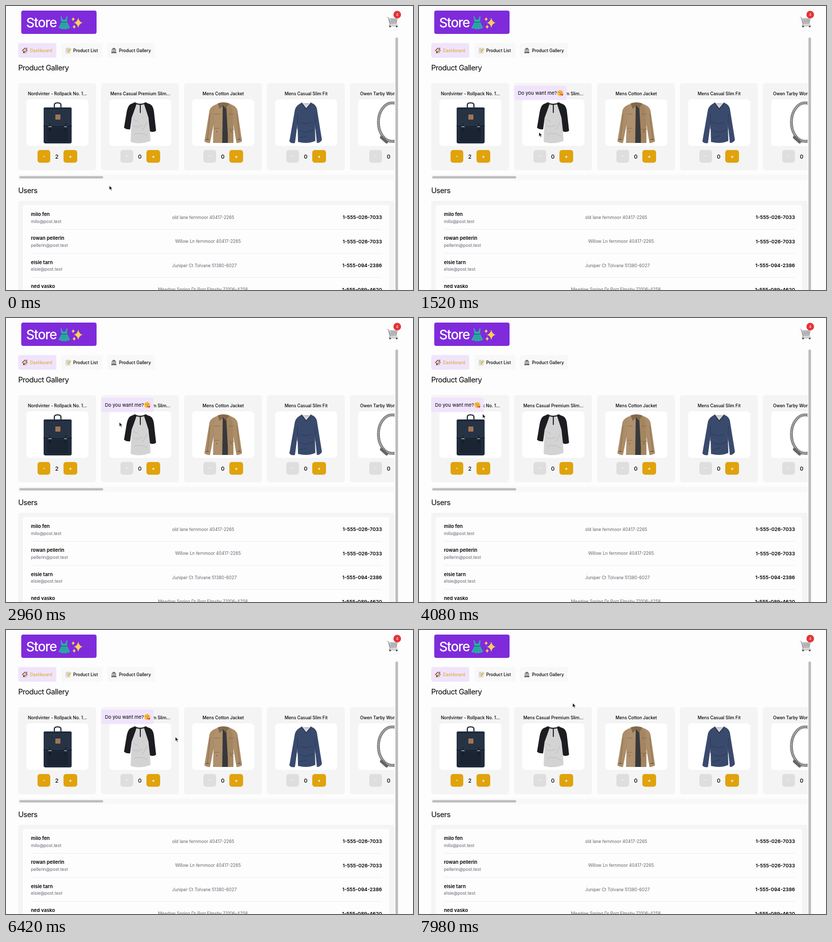
Recreate the animation shown at these times as an HTML page. Size 800 by 560 pixels, loop 8000 ms.

```html
<!DOCTYPE html>
<html lang="en">
<head>
<meta charset="utf-8">
<title>Store</title>
<style>
html, body { margin: 0; width: 100%; height: 100%; overflow: hidden; background: #fdfdfe; }
svg { display: block; }
text { font-family: Inter, "Liberation Sans", sans-serif; fill: #000; }
.logo { font-size: 26px; font-weight: 500; letter-spacing: -1.2px; fill: #fff; }
.head { font-size: 14.5px; letter-spacing: -.44px; }
.label { font-size: 8.5px; font-weight: 500; }
.gold { fill: #dda01c; font-weight: 400; }
.tip { font-size: 9.4px; }
.count { font-size: 11px; font-weight: 500; }
.sign { font-size: 10px; font-weight: 600; fill: #fff; }
.name { font-size: 9.6px; font-weight: 600; }
.soft { font-size: 8.5px; fill: #62646e; }
.badge { font-size: 7px; fill: #fff; }
</style>
</head>
<body>
<svg id="stage" width="800" height="560" viewBox="0 0 800 560">
  <defs><clipPath id="strip"><rect x="24" y="150" width="740" height="176"/></clipPath></defs>
</svg>
<script>
const stage = document.getElementById('stage');
const PAGE = '#fdfdfe', PANEL = '#f4f4f5', TRACK = '#f8f8f9', BAR = '#bcbcbd', LILAC = '#f0e4fc';
const GOLD = '#e0a30c', GOLD_HOVER = '#eaaa38', DISABLED = '#dededf';
const CARD_X = 24, CARD_STEP = 163, CARD_W = 153, CARD_TOP = 152, CARD_H = 172;

const box = (x, y, w, h, fill, r = 0, extra = '') =>
  `<rect x="${x}" y="${y}" width="${w}" height="${h}" rx="${r}" fill="${fill}" ${extra}/>`;
const text = (x, y, str, cls, anchor = 'start') =>
  `<text x="${x}" y="${y}" class="${cls}" text-anchor="${anchor}">${str}</text>`;
const shape = (d, fill, extra = '') => `<path d="${d}" fill="${fill}" ${extra}/>`;
const line = (d, color, width = 1) =>
  shape(d, 'none', `stroke="${color}" stroke-width="${width}" stroke-linecap="round"`);
const disc = (x, y, r, fill) => `<circle cx="${x}" cy="${y}" r="${r}" fill="${fill}"/>`;
const group = (x, y, content) => `<g transform="translate(${x} ${y})">${content}</g>`;
const star = (x, y, r) => group(x, y,
  shape(`M0 ${-r}Q${r * .16} ${-r * .16} ${r * .85} 0Q${r * .16} ${r * .16} 0 ${r}Q${-r * .16} ${r * .16} ${-r * .85} 0Q${-r * .16} ${-r * .16} 0 ${-r}Z`, '#f8d257'));

const dress =
  shape('M109 20L111 26Q114 28 117 26L119 20L121 21L120 31Q123 37 126 43Q115 49 103 43Q107 37 109 31L107 21Z', '#2fa9a8') +
  line('M109 32H119', '#0b716d', 1.6) +
  line('M111 35L108 44M114 35V45M117 35L121 44', '#13888a', .8);

const house = group(31, 82,
  shape('M2 5H10V11H2Z', '#dcc29c') + shape('M0 6L6 0L12 6L11 7L6 2L1 7Z', '#8f4437') +
  box(3, 7, 2.5, 4, '#6b4635') + box(7, 6.5, 2.2, 2.3, '#6f9dbd') + box(9, 0, 1.5, 3, '#7d4a40'));

const memo = group(117, 82,
  shape('M1 1H9V11H1Z', '#efeee8', 'stroke="#b3b3ae" stroke-width=".6"') +
  line('M2.5 3H7.5M2.5 5H7.5M2.5 7H5', '#8f8f8c', .6) + line('M5 9L10 3', '#e5a51c', 1.7));

const museum = group(207, 82,
  shape('M0 4L5 0L10 4Z', '#6d675b') + line('M1.5 5V9M4 5V9M6.2 5V9M8.5 5V9', '#5f5a50', 1.2) +
  box(0, 9, 10, 2, '#625d53'));

const cart =
  shape('M752 25H769L767 34H754Z', '#e9e9e9', 'stroke="#858588" stroke-width=".8"') +
  line('M749 22L752 23L755 36H769M754 28H768M754 31H767M757 25V34M760 25V34M763 25V34M766 25V34', '#757578', .8) +
  line('M755 36L753 39H770', '#757578') + disc(755, 40.5, 1.6, '#393939') + disc(768, 40.5, 1.6, '#393939');

const kiss = (x, y) => group(x, y,
  disc(0, 0, 6, '#f6c145') + line('M-3 -1.5Q-2 -2.7 -1 -1.5', '#573719', .9) + disc(2, -1.5, .8, '#573719') +
  line('M0 1Q2 1.5 0 2.4Q2 3 0 3.8', '#753b1c', .8) +
  shape('M4 6L1.5 3Q1.5 1 3.7 2.2Q5.8 .9 6.2 3Z', '#e83a4c'));

// Product pictures share one coordinate space: the card's top-left corner is 0,0.
const backpack =
  line('M71 49V43Q71 39 77 39Q84 39 84 43V49', '#1b2430', 2.2) +
  shape('M50 50Q50 48 53 48H102Q105 48 105 50L105 116Q105 119 101 119H54Q50 119 50 116Z', '#202b3a') +
  shape('M50 52H105V84Q77 86 50 84Z', '#263344') + line('M50 84.5Q77 87 105 84.5', '#121a25', 1.2) +
  box(57, 88, 41, 27, '#1a2432', 2) + box(73, 62, 10, 10, '#a07453', 1) +
  line('M62 80V96M93 80V96', '#121a25', 1.5) + line('M60 86H65M91 86H95', '#b9b8b4', 1.5);

const raglan =
  shape('M66 39Q77 43 88 39L94 62L97 114Q77 122 58 116L60 62Z', '#d3d3d4') +
  shape('M66 38L57 42Q52 46 50 58L45 88Q50 92 57 91L60 68Q66 52 70 40Z', '#1d1c20') +
  shape('M87 38L97 42Q103 46 104 58L108 94Q102 98 96 95L93 68Q88 52 84 40Z', '#1d1c20') +
  line('M66 39Q77 45 88 39', '#232226', 2.4) + line('M77 43V58', '#232226', 2) +
  line('M63 84Q72 89 81 83M65 101Q80 96 91 104M64 72L72 76M90 78L82 92', '#bababc', 1);

const jacket =
  shape('M66 41L77 38L90 41Q103 45 105 54L114 115Q108 119 103 118L97 82V118H57L58 82L51 118Q45 119 40 115L50 54Q52 45 66 41Z', '#ab8d69') +
  shape('M71 43H85L87 86L86 118H74L75 86Z', '#38393c') +
  shape('M66 40L76 45L75 118H57L60 52Z', '#af916d') + shape('M89 40L83 47L87 118H97L95 51Z', '#a38560') +
  shape('M66 40Q77 36 89 40L82 50L77 44L70 51Z', '#82694e') +
  line('M60 61H70M88 61H97M59 89H69M88 91H98M51 60L46 112M104 60L109 112', '#866c4d') +
  line('M64 95V96M92 94V96M43 111H49M105 111H111', '#4e3f2d', 1.2);

const sweater =
  shape('M68 39Q77 42 87 39Q96 42 98 50L108 112Q105 118 98 118L94 78L95 114Q80 121 61 116L60 80L55 118Q48 120 44 115L55 52Q58 43 68 39Z', '#394a6d') +
  shape('M69 39L77 50L86 39Q77 43 69 39Z', '#d4d4d6') + line('M68 39L77 51L87 39', '#26344f', 1.5) +
  line('M60 62V90M95 62V90M63 77Q76 83 88 77M65 94Q79 100 92 92M64 108L78 104', '#2c3a58', 1.1);

const bracelet =
  '<ellipse cx="83" cy="77" rx="27" ry="38" fill="none" stroke="#77777a" stroke-width="5.5"/>' +
  '<ellipse cx="83" cy="77" rx="27" ry="38" fill="none" stroke="#bcbcbe" stroke-width="3" stroke-dasharray="2 1.5"/>' +
  line('M62 107L72 116', '#666668', 6);

const products = [
  ['Nordvinter - Rollpack No. 1...', backpack, 2],
  ['Mens Casual Premium Slim...', raglan, 0],
  ['Mens Cotton Jacket', jacket, 0],
  ['Mens Casual Slim Fit', sweater, 0],
  ['Owen Tarby Womens Chain...', bracelet, 0]
];

const card = ([title, picture, count], i) => {
  const wide = i === products.length - 1;
  return group(CARD_X + i * CARD_STEP, CARD_TOP,
    box(0, 0, CARD_W, CARD_H, PANEL, 5) + box(16, 32, 122, 92, '#fff', 7) +
    text(wide ? 20 : 77, 24.4, title, 'label', wide ? 'start' : 'middle') + picture +
    box(38, 132, 25, 25, count ? GOLD : DISABLED, 5) + text(50.5, 148, '-', 'sign', 'middle') +
    text(76, 148.5, count, 'count', 'middle') +
    box(89, 132, 27, 25, GOLD, 5, `id="plus${i}"`) + text(102.5, 148, '+', 'sign', 'middle'));
};

const users = [
  ['milo fen', 'milo@post.test', 'old lane fernmoor 40417-2265', '1-555-026-7033', 387.5],
  ['rowan pellerin', 'pellerin@post.test', 'Willow Ln fernmoor 40417-2265', '1-555-026-7033', 397],
  ['elsie tarn', 'elsie@post.test', 'Juniper Ct Tolvane 51380-6027', '1-555-094-2386', 390],
  ['ned vasko', 'ned@post.test', 'Meadow Spring Dr Port Elmsby 73106-4258', '1-555-089-4620', 387]
];

const userRow = ([name, mail, address, phone, middle], i) => group(0, 414 + i * 47.4,
  text(49, 0, name, 'name') + text(49, 13.7, mail, 'soft') +
  text(middle, 6, address, 'soft', 'middle') + text(739, 6.3, phone, 'name', 'end') +
  box(49, 26, 690, 1, '#ededf0'));

const arrow = shape('M0 0V8.6L2 6.8L3.5 10L5 9.2L3.5 6.2H6.3Z', '#111', 'stroke="#fff" stroke-width=".7" id="arrow"');
const hand = shape('M-3 -5Q-1.5 -6 -1 -4L0 -1Q1-2.5 2-1Q3.5-2 4 -.5Q6-1 6 1V3Q6 6 3 6H0Q-2 5-4.5 1Q-4 -.5-2 .6Z',
  '#fff', 'stroke="#222" stroke-width=".9" id="hand"');

stage.innerHTML += [
  box(0, 0, 800, 560, PAGE),
  box(30, 9, 148, 46, '#7f2bdc', 4), text(39.5, 42, 'Store', 'logo'), dress,
  star(142, 33, 10), star(132, 26, 4.5), star(134, 41, 4.5),
  cart, disc(769, 17, 7.5, '#e53238'), text(769, 19.6, '4', 'badge', 'middle'),
  box(24, 73, 75, 29, LILAC, 4), house, text(47, 91, 'Dashboard', 'label gold'),
  box(109, 73, 81, 29, TRACK, 4), memo, text(132, 91, 'Product List', 'label'),
  box(199, 73, 94, 29, TRACK, 4), museum, text(222, 91, 'Product Gallery', 'label'),
  text(24, 127, 'Product Gallery', 'head'),
  `<g clip-path="url(#strip)">${products.map(card).join('')}</g>`,
  box(24, 332.5, 740, 11, TRACK), box(26, 335.5, 165, 4.5, BAR, 2.2),
  text(24, 369, 'Users', 'head'),
  box(24, 384, 740, 190, PANEL, 5), box(33, 392, 720, 180, PAGE, 5),
  users.map(userRow).join(''),
  box(765.5, 62, 5, 510, BAR, 2.5),
  `<g id="tip">${box(0, 157, 103, 28.5, LILAC, 3)}${text(7.5, 175, 'Do you want me?', 'tip')}${kiss(90.5, 171.5)}</g>`,
  `<g id="cursor">${arrow}${hand}</g>`
].join('');

const LOOP = 8000;
const path = [
  [0, 203, 354], [720, 130, 296], [900, 130, 296], [1980, 303, 219], [4080, 125, 189],
  [5440, 247, 198], [7160, 389, 219], [7980, 302, 144], [LOOP, 302, 144]
];
const el = id => document.getElementById(id);
const show = (node, on) => node.setAttribute('visibility', on ? 'visible' : 'hidden');
const [tip, cursor, arrowEl, handEl] = ['tip', 'cursor', 'arrow', 'hand'].map(el);
const pluses = products.map((_, i) => el('plus' + i));

function pointAt(t) {
  const next = path.findIndex(p => p[0] > t);
  const [t0, x0, y0] = path[next - 1], [t1, x1, y1] = path[next];
  const k = (t - t0) / (t1 - t0), ease = k * k * (3 - 2 * k);
  return [x0 + (x1 - x0) * ease, y0 + (y1 - y0) * ease];
}

function draw() {
  const [x, y] = pointAt(performance.now() % LOOP);
  const index = Math.floor((x - CARD_X) / CARD_STEP);
  const left = CARD_X + index * CARD_STEP;
  const dx = x - left, dy = y - CARD_TOP;
  const overCard = dx >= 0 && dx < CARD_W && dy >= 0 && dy < CARD_H;
  const overRow = overCard && dy > 132 && dy < 157;
  const overPlus = overRow && dx > 89 && dx < 116;
  const overMinus = overRow && dx > 38 && dx < 63;

  cursor.setAttribute('transform', `translate(${x} ${y})`);
  tip.setAttribute('transform', `translate(${left} 0)`);
  show(tip, overCard);
  show(handEl, overPlus || overMinus);
  show(arrowEl, !(overPlus || overMinus));
  pluses.forEach((p, i) => p.setAttribute('fill', overPlus && i === index ? GOLD_HOVER : GOLD));
  requestAnimationFrame(draw);
}
draw();
</script>
</body>
</html>
```
